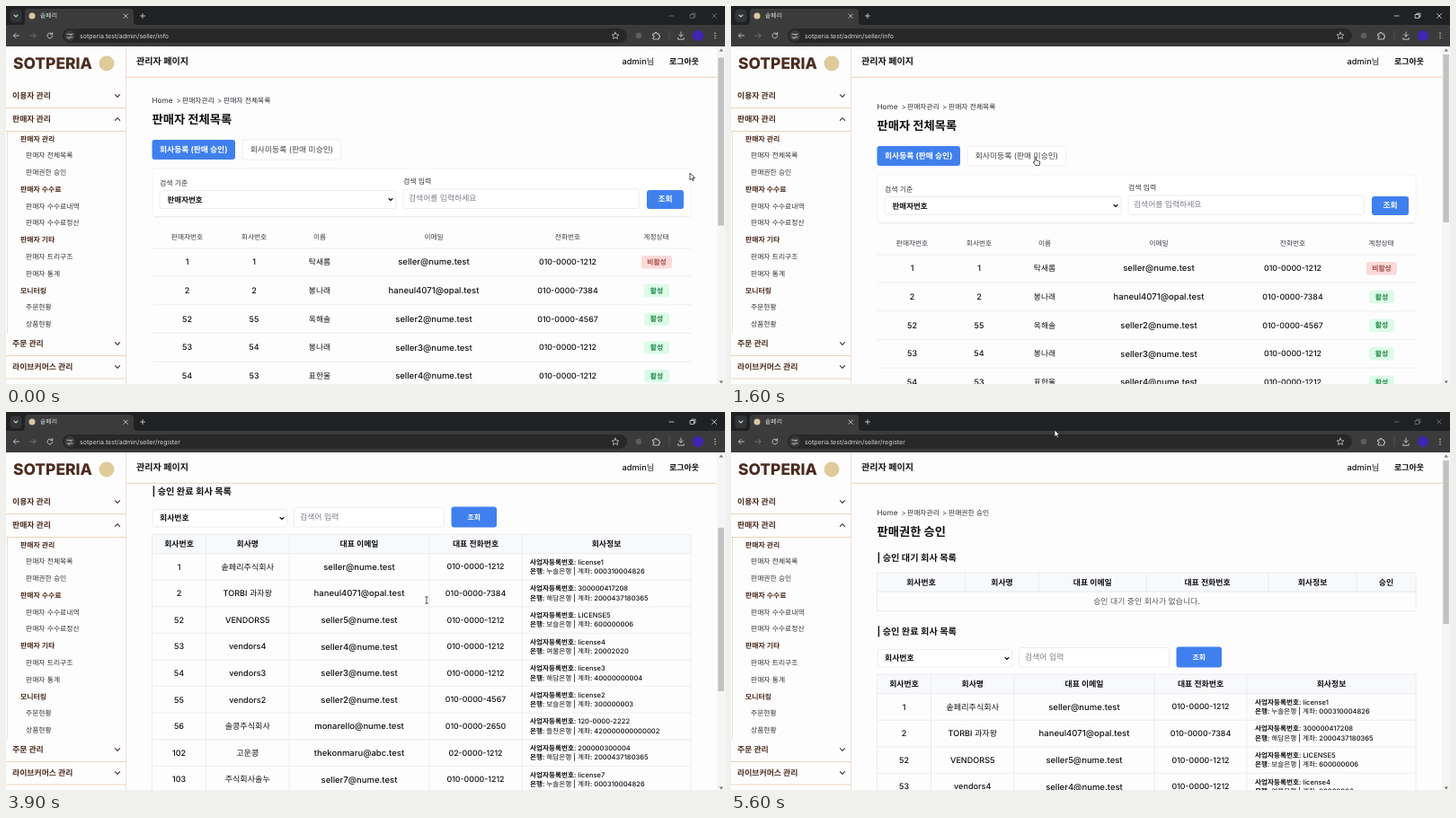
An HTML page that plays this animation: 800 by 421 pixels, repeating every 5.7 s.

```html
<!DOCTYPE html>
<html lang="ko">
<head>
<meta charset="utf-8">
<title>관리자 페이지</title>
<style>
html, body { margin: 0; width: 100%; height: 100%; overflow: hidden; background: #fff; }
svg { display: block; width: 100vw; height: 100vh; }
text { font-family: Inter, "Noto Sans CJK KR", "Noto Sans CJK", sans-serif; text-rendering: geometricPrecision; white-space: pre; }
.c { text-anchor: middle; }
.m { font-weight: 500; }
.b { font-weight: 700; }
.x { font-weight: 800; }
.line { fill: none; stroke-linecap: round; stroke-linejoin: round; }
</style>
</head>
<body>
<svg id="stage" viewBox="0 0 800 421" preserveAspectRatio="none"></svg>
<script>
const LOOP = 5700, STEP = 100;
const INK = '#111114', GREY = '#4b4d54', BROWN = '#4b2d20', BLUE = '#4080ee', RULE = '#e9eaee', TAN = '#ecd0b4';

// Drawing helpers; text is centred vertically on y
const text = (x, y, s, size, fill = INK, cls = '') =>
  `<text x="${x}" y="${y + size * .36}" font-size="${size}" fill="${fill}" class="${cls}">${s}</text>`;
const box = (x, y, w, h, fill, r = 0, stroke = 'none') =>
  `<rect x="${x}" y="${y}" width="${w}" height="${h}" rx="${r}" fill="${fill}" stroke="${stroke}" stroke-width=".8"/>`;
const path = (d, stroke, w = 1) => `<path class="line" d="${d}" stroke="${stroke}" stroke-width="${w}"/>`;
const dot = (x, y, r, fill) => `<circle cx="${x}" cy="${y}" r="${r}" fill="${fill}"/>`;
const chevron = (x, y, color, up = 1, s = 2.6) =>
  path(`M${x - s} ${y - up * s / 2}l${s} ${up * s}l${s} ${-up * s}`, color, 1.1);
const group = (id, body) => `<g id="${id}">${body}</g>`;
const each = (list, fn) => list.map(fn).join('');

// Browser frame
const ICON = '#c9cacc';
const url = page => text(82, 33, `sotperia.test/admin/seller/${page}`, 7, '#d4d5d7');
const controls = color => path('M738 11h5M761.500 9.500h4v4h-4zM763 9.500v-1.300h4v4h-1.500M785.500 8.500l5 5M790.500 8.500l-5 5', color, .8);

function browser() {
  return box(0, 0, 800, 45, '#202122') + box(0, 21, 800, 24, '#3b3b3c')
    + '<path d="M17 21q4 0 4-4V7q0-4 4-4H138q4 0 4 4v10q0 4 4 4z" fill="#3b3b3c"/>'
    + box(4.5, 4, 13, 14, '#333435', 4) + chevron(11, 11, ICON, 1, 2)
    + dot(29, 11, 3.5, '#d9c8a4') + text(38, 11, '솥페리', 6.9, '#dcdddf')
    + path('M131 9l4.400 4.400M135.400 9l-4.400 4.400M149.500 11h5M152 8.500v5', ICON, .9)
    + path('M14.500 33h-6m2.500-2.600l-2.600 2.600l2.600 2.600', ICON, .9)
    + path('M27 33h6m-2.500-2.600l2.600 2.600l-2.600 2.600', '#77787a', .9)
    + path('M51.400 31.500a2.900 2.900 0 1 0 .4 1.900M51.700 29.600v2.100h-2.100', ICON, .9)
    + box(63, 25, 628, 16, '#282829', 8) + dot(71, 33, 6, '#3b3b3c')
    + path('M68 31.300h2.500M73.500 31.300h.5M68 34.900h.5M71.500 34.900h2.500', ICON, .9)
    + path('M71.900 31.300a.8 .8 0 1 0 .1 0M70 34.900a.8 .8 0 1 0 .1 0', ICON, .7)
    + path('M678 29.200l1.200 2.500 2.700.3-2 1.800.6 2.700-2.500-1.400-2.500 1.400.6-2.700-2-1.800 2.700-.3z', ICON, .8)
    + dot(704, 33, 3.2, '#5d5e60')
    + path('M720 31h2v-1.500h2v1.500h2.500v2h1v2h-1v2h-6.500v-2h1v-2h-1z', ICON, .9)
    + path('M738 28v10', '#56575a', .8)
    + path('M751 29v5m-2.300-2.200l2.300 2.300l2.300-2.300M747.800 35.500v1.700h6.400v-1.700', ICON, .9)
    + dot(770, 33, 6, '#4024b4') + each([30.3, 33, 35.7], y => dot(789, y, .8, ICON))
    + group('urlInfo', url('info')) + group('urlRegister', url('register'))
    + group('dim', controls('#747577')) + group('lit', controls('#dedfe1'));
}

// Fixed site header and menu
const MENU = ['판매자 관리', '-판매자 전체목록', '-판매권한 승인', '판매자 수수료', '-판매자 수수료내역', '-판매자 수수료정산',
  '판매자 기타', '-판매자 트리구조', '-판매자 통계', '모니터링', '-주문현황', '-상품현황'];

function sidebar() {
  const heads = [['이용자 관리', 100, 1], ['판매자 관리', 126, -1], ['주문 관리', 376, 1], ['라이브커머스 관리', 402, 1]];
  return box(0, 45, 133, 376, '#fefdfd')
    + path('M133.500 45v376', '#e9dad0', .8) + path('M1.500 140v224', '#d9d5d3', .7)
    + path('M0 113.500h133M0 139.500h133M0 389.500h133M0 415h133', TAN, .9)
    + text(8, 64, 'SOTPERIA', 17.4, BROWN, 'x') + dot(112, 64, 8.5, '#dfcb99')
    + each(heads, ([s, y, up]) => text(7, y, s, 8.9, BROWN, 'b') + chevron(124, y, '#40342e', up))
    + each(MENU, s => {
        const y = 147.8 + 18.77 * MENU.indexOf(s);
        return s[0] === '-' ? text(22, y, s.slice(1), 7.8, '#363434') : text(16, y, s, 7.9, BROWN, 'b');
      });
}

function header() {
  return box(134, 45, 657, 34, '#fefdfe') + path('M133 79.300h658', TAN, 1)
    + text(145, 61.5, '관리자 페이지', 10.1, INK, 'b')
    + text(685.5, 61.5, 'admin님', 9.3, INK, 'm') + text(738, 61.5, '로그아웃', 9, INK, 'b');
}

const crumbs = last => text(162.5, 112.5, 'Home', 8.2, '#2f3035') + text(189.5, 112.5, '&gt;', 8, GREY)
  + text(196, 112.5, '판매자관리', 7.8, '#2f3035') + text(235, 112.5, '&gt;', 8, GREY) + text(242, 112.5, last, 7.8, '#2f3035');
const button = (x, y, w, h, s, size) => box(x, y, w, h, BLUE, 3) + text(x + w / 2, y + h / 2 - .3, s, size, '#fff', 'b c');

// Seller list page
const NUME = '@nume.test', PHONE = '010-0000-1212';
const SELLERS = [
  [1, 1, '탁새롬', 'seller' + NUME, PHONE],
  [2, 2, '봉나래', 'haneul4071@opal.test', '010-0000-7384'],
  [52, 55, '옥해솔', 'seller2' + NUME, '010-0000-4567'],
  [53, 54, '봉나래', 'seller3' + NUME, PHONE],
  [54, 53, '표한울', 'seller4' + NUME, PHONE],
  [55, 52, '방이솔', 'seller5' + NUME, PHONE],
  [61, 56, '방이솔', 'monarello' + NUME, '010-0000-2650'],
  [102, 102, '고운콩', 'thekonmaru@abc.test', '02-0000-1212'],
  [103, 103, '탁새롬', 'seller7' + NUME, PHONE],
  [104, 104, '표한울', 'seller8' + NUME, PHONE]
];
const LIST_X = [201.5, 276, 349, 476, 625, 723.5];

function tabs(first) {
  const tab = (x, w, s, on) => box(x, 156, w, 22, on ? BLUE : '#fff', 3, on ? 'none' : RULE)
    + text(x + w / 2, 166.5, s, 8.8, on ? '#fff' : '#3f4046', on ? 'b c' : 'c');
  return tab(162.5, 92.5, '회사등록 (판매 승인)', first) + tab(263.2, 109.5, '회사미등록 (판매 미승인)', !first);
}

function sellerRow(row, i) {
  const y = 292 + 31.7 * i;
  const badge = i ? box(710, y - 7, 28, 14.5, '#dcfce7', 3) + text(724, y, '활성', 7.8, '#1f8446', 'b c')
    : box(707, y - 7, 34, 14.5, '#fdd9d9', 3) + text(724, y, '비활성', 7.8, '#a4504c', 'b c');
  return each(row, (s, j) => text(LIST_X[j], y, s, [9, 9, 8.8, 9.5, 8.8][j], INK, 'm c'))
    + badge + path(`M163 ${y + 16}h599`, RULE, .7);
}

function sellerPage() {
  return crumbs('판매자 전체목록') + text(162.5, 133.5, '판매자 전체목록', 13.3, INK, 'b')
    + group('tabFirst', tabs(true)) + group('tabSecond', tabs(false))
    + box(163, 188, 599, 53.5, '#fff', 3, '#eff0f3') + path('M165 242h595', '#e8e9ed', .8)
    + text(171, 204.5, '검색 기준', 7.9, '#2f3035') + text(442, 202.5, '검색 입력', 7.9, '#2f3035')
    + box(171, 212.5, 263, 20, '#fff', 2.5, RULE) + text(179.5, 222.5, '판매자번호', 8.5, INK, 'b') + chevron(428, 222.5, INK, 1, 2)
    + box(442, 211, 262.5, 21.5, '#fff', 2.5, RULE) + text(448, 221, '검색어를 입력하세요', 8.8, '#7c7f88')
    + button(713, 212, 41, 21, '조회', 8.8)
    + each(['판매자번호', '회사번호', '이름', '이메일', '전화번호', '계정상태'], (s, i) => text(LIST_X[i], 264.3, s, 7.7, '#3b3d43', 'c'))
    + path('M163 277h599', RULE, .8) + group('rows', each(SELLERS, sellerRow));
}

// Approval page
const COMPANIES = [
  [1, '솥페리주식회사', 0, 'license1', '누솔은행', '000310004826'],
  [2, 'TORBI 과자왕', 1, '300000417208', '해담은행', '2000437180365'],
  [52, 'VENDORS5', 5, 'LICENSE5', '보슬은행', '600000006'],
  [53, 'vendors4', 4, 'license4', '여울은행', '20002020'],
  [54, 'vendors3', 3, 'license3', '해담은행', '40000000004'],
  [55, 'vendors2', 2, 'license2', '보슬은행', '300000003'],
  [56, '솔콩주식회사', 6, '120-0000-2222', '들찬은행', '420000000000002'],
  [102, '고운콩', 7, '200000300004', '해담은행', '2000437180365'],
  [103, '주식회사솔누', 8, 'license7', '누솔은행', '000310004826']
];

function grid(xs, ys) {
  const [l, r, t, b] = [xs[0], xs.at(-1), ys[0], ys.at(-1)];
  return path(each(xs, x => `M${x} ${t}V${b}`) + each(ys, y => `M${l} ${y}H${r}`), RULE, .8);
}
const mid = (xs, i) => (xs[i] + xs[i + 1]) / 2;
const heads = (xs, y, names) => box(xs[0], y - 10.7, xs.at(-1) - xs[0], 21.5, '#f8f9fb')
  + each(names, (s, i) => text(mid(xs, i), y, s, 8.9, INK, 'b c'));

const DONE_X = [162.5, 222.5, 315, 471, 574, 762];
function companyRow([id, name, seller, license, bank, account], i) {
  const y = 328.3 + 29.6 * i;
  const [email, phone] = SELLERS[seller].slice(3);
  const bold = s => `<tspan class="b">${s}</tspan>`;
  return each([id, name, email, phone], (s, j) => text(mid(DONE_X, j), y, s, [9, 9.1, 9.5, 8.8][j], INK, 'm c'))
    + text(583, y - 5.2, bold('사업자등록번호') + ': ' + license, 7.6, INK, 'm')
    + text(583, y + 5.2, bold('은행') + `: ${bank} | 계좌: ${account}`, 7.6, INK, 'm');
}

function approvalPage() {
  const waitX = [162.5, 260.5, 342.5, 462, 598, 696, 762];
  const title = (y, s) => text(162.5, y, '| ' + s, 10.2, INK, 'b');
  return crumbs('판매권한 승인') + text(162.5, 133.5, '판매권한 승인', 13.3, INK, 'b')
    + title(162, '승인 대기 회사 목록')
    + heads(waitX, 189.3, ['회사번호', '회사명', '대표 이메일', '대표 전화번호', '회사정보', '승인'])
    + grid(waitX, [179, 200]) + grid([162.5, 762], [200, 221.5])
    + text(462.5, 210.5, '승인 대기 중인 회사가 없습니다.', 8.9, '#54565d', 'c')
    + title(244.8, '승인 완료 회사 목록')
    + box(163, 264.5, 150, 19.5, '#fff', 2.5, RULE) + text(171, 274, '회사번호', 8.9, INK, 'b') + chevron(307, 274.5, INK, 1, 2)
    + box(320.5, 262.5, 167, 21.5, '#fff', 2.5, RULE) + text(327, 272.5, '검색어 입력', 8.9, '#7c7f88')
    + button(495.5, 261.5, 50.5, 23, '조회', 7.9)
    + heads(DONE_X, 303, ['회사번호', '회사명', '대표 이메일', '대표 전화번호', '회사정보'])
    + grid(DONE_X, [292.3, ...COMPANIES.map((_, i) => 313.6 + 29.6 * i), 313.6 + 29.6 * COMPANIES.length])
    + each(COMPANIES, companyRow);
}

const thumb = h => box(792.3, 54, 6.6, h, '#c2c2c3');
const scrollbar = () => box(791, 45, 9, 376, '#f6f5f6')
  + '<path d="M793.500 50.500l2.300-3 2.300 3zM793.500 417.500l2.300 3 2.300-3z" fill="#77787a"/>'
  + group('thumbSeller', thumb(187)) + group('thumbApproval', thumb(182));

const shape = (id, d) => `<path id="${id}" d="${d}" fill="#fff" stroke="#222" stroke-width=".8" stroke-linejoin="round"/>`;
const pointer = () => group('pointer',
  shape('arrow', 'M0 0v7.600l1.800-1.600 1.200 2.700 1.300-.6-1.200-2.600h2.500z')
  + shape('hand', 'M-1 0q1-1 1.700 0v3l3 .6q1.100.3 1 1.400l-.6 3.600h-4.200l-2.700-3.600q.2-1.200 1.800-.2z')
  + group('beam', path('M-1.500 -3.500h3M0 -3.500v7M-1.500 3.500h3', '#333', .8)));

document.getElementById('stage').innerHTML =
  '<defs><clipPath id="view"><rect x="134" y="79" width="657" height="342"/></clipPath></defs>'
  + box(0, 0, 800, 421, '#fefdfe')
  + `<g clip-path="url(#view)">${group('seller', group('scrollSeller', sellerPage()))}`
  + `${group('approval', group('scrollApproval', approvalPage()))}</g>`
  + header() + sidebar() + scrollbar() + browser() + pointer();

// Motion: [ms, ...values], linear between keys
const SELLER_SCROLL = [[0, 7], [300, 88], [500, 140], [600, 153], [700, 156], [900, 156], [1100, 40], [1300, 0]];
const APPROVAL_SCROLL = [[0, 0], [3500, 0], [3700, 104], [3800, 145], [3900, 156], [4200, 156], [4400, 50], [4600, 0]];
const POINTER = [[0, 761, 186], [1100, 761, 186], [1300, 560, 176], [1500, 339, 169], [1900, 339, 169], [2200, 150, 180],
  [2400, 44, 184], [2600, 44, 184], [2900, 220, 196], [3300, 468, 209.5], [4300, 468, 209.5], [4700, 491, 62],
  [4900, 491, 62], [5400, 360, 20]];

function at(keys, t) {
  const i = keys.findLastIndex(k => k[0] <= t), [from, ...vals] = keys[i], next = keys[i + 1];
  return next ? vals.map((v, j) => v + (next[j + 1] - v) * (t - from) / (next[0] - from)) : vals;
}

let css = '';
function animate(id, style) {
  let frames = '';
  for (let t = 0; t < LOOP; t += STEP) frames += `${Math.max(0, t - 1) / LOOP * 100}%{${style(t)}}`;
  css += `@keyframes ${id}{${frames}}#${id}{animation:${id} ${LOOP}ms step-end infinite}`;
}
const show = (id, test) => animate(id, t => `opacity:${+test(t)}`);
const move = (id, keys, k) => animate(id, t => `transform:translateY(${at(keys, t)[0] * k}px)`);

const TAB = 1800, PAGE = 2600;
const onHand = t => t >= 1500 && t < 2000 || t >= 2400 && t < 2700;
const onBeam = t => t >= 3300 && t < 4400;

show('seller', t => t < PAGE);
show('approval', t => t >= PAGE);
show('urlInfo', t => t < PAGE);
show('urlRegister', t => t >= PAGE);
show('tabFirst', t => t < TAB);
show('tabSecond', t => t >= TAB);
show('rows', t => t < TAB);
show('lit', t => t >= 1300 && t < 5500);
show('dim', t => t < 1300 || t >= 5500);
show('hand', onHand);
show('beam', onBeam);
show('arrow', t => !onHand(t) && !onBeam(t));
move('scrollSeller', SELLER_SCROLL, -1);
move('scrollApproval', APPROVAL_SCROLL, -1);
animate('thumbSeller', t => `opacity:${+(t < TAB)};transform:translateY(${at(SELLER_SCROLL, t)[0] * .5}px)`);
animate('thumbApproval', t => `opacity:${+(t >= PAGE)};transform:translateY(${at(APPROVAL_SCROLL, t)[0] * .48}px)`);
animate('pointer', t => `transform:translate(${at(POINTER, t).map(v => v + 'px')})`);

document.head.appendChild(document.createElement('style')).textContent = css;
</script>
</body>
</html>
```
